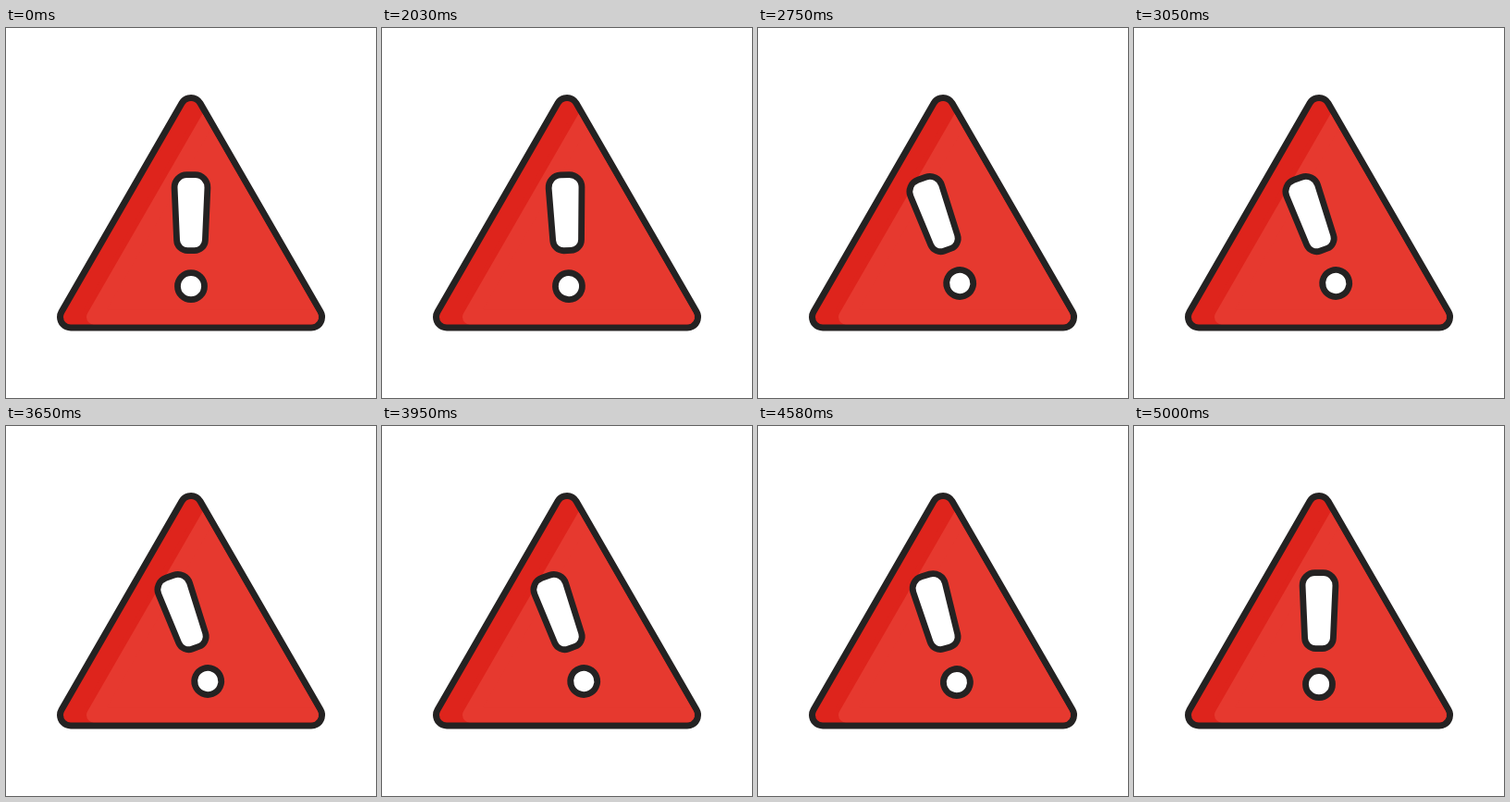
An HTML page for the animation above (5.03 s loop, 400 px wide and 400 px high).

```html
<!DOCTYPE html>
<html lang="en">
<head>
<meta charset="utf-8">
<title>Warning sign</title>
<style>
  html, body { margin: 0; height: 100%; overflow: hidden; background: #fff; }
  svg { display: block; width: 100vw; height: 100vh; }
  path { stroke-linejoin: round; }
  .ink { fill: #242222; stroke: #242222; }
  .white { fill: #fff; stroke: #fff; }
  .dark { fill: #de241c; stroke: #de241c; }
  .red { fill: #e6392f; stroke: #e6392f; }
  #mark { fill: #fff; stroke: #242222; stroke-width: 6.8; }
</style>
</head>
<body>
<svg viewBox="0 0 400 400">
  <defs>
    <path id="sign" d="M70 312.5L200 87 330 312.5Z"/>
    <mask id="inside" maskUnits="userSpaceOnUse" x="0" y="0" width="400" height="400">
      <use href="#sign" class="white" stroke-width="16"/>
    </mask>
  </defs>
  <use href="#sign" class="ink" stroke-width="30"/>
  <use href="#sign" class="dark" stroke-width="16"/>
  <g mask="url(#inside)">
    <use href="#sign" x="25" class="red" stroke-width="16"/>
  </g>
  <g id="mark">
    <path d="M195.5 158.7h9A13.4 13.4 0 0 1 217.9 172.7L215.4 229.5A11.6 11.6 0 0 1 203.8 240.6h-7.6A11.6 11.6 0 0 1 184.6 229.5L182.1 172.7A13.4 13.4 0 0 1 195.5 158.7Z"/>
    <circle cx="200" cy="279.2" r="14.5"/>
  </g>
</svg>
<script>
  const LOOP = 5030, PAUSE = 2000, STEP = 30;
  const SWING = 5, LAST = 85, END = 100, TILT = 20;
  const mark = document.getElementById('mark');
  const smooth = u => u * u * (3 - 2 * u);

  // Tilt at each end of a swing: upright first, then left and right in turn.
  const peak = i => i === 0 ? 0 : i % 2 ? -TILT : TILT;

  function angle(step) {
    if (step >= LAST) return -TILT * ((END - step) / (END - LAST)) ** 3;
    const i = Math.floor(step / SWING);
    return peak(i) + (peak(i + 1) - peak(i)) * smooth(step / SWING - i);
  }

  function draw() {
    const t = performance.now() % LOOP;
    const step = Math.min(END, Math.max(0, Math.floor((t - PAUSE) / STEP)));
    mark.setAttribute('transform', `rotate(${angle(step)} 200 226)`);
    requestAnimationFrame(draw);
  }
  draw();
</script>
</body>
</html>
```
